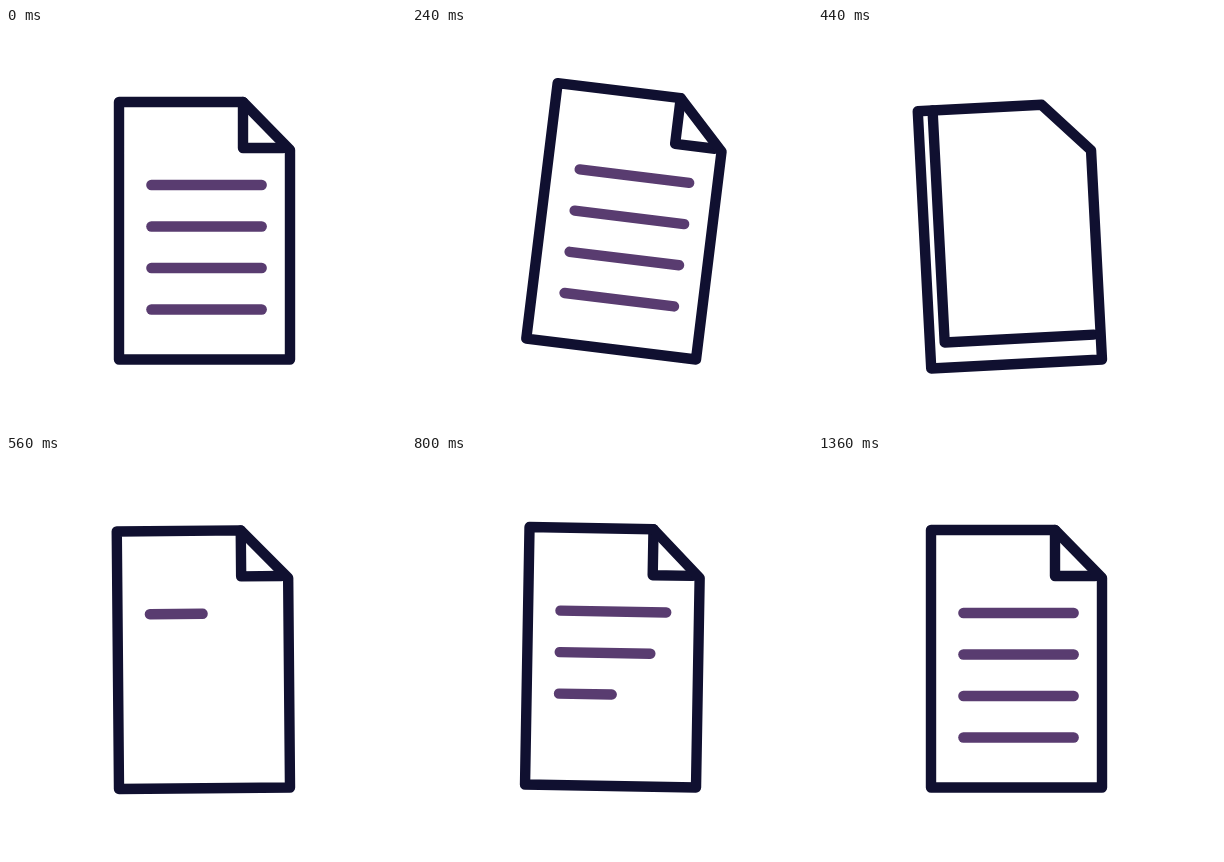
An HTML page that plays this animation: 400x400 px, repeating every 1960 ms.

```html
<!DOCTYPE html>
<html lang="en">
<head>
<meta charset="utf-8">
<title>Turning page</title>
<style>
  html, body { margin: 0; height: 100%; overflow: hidden; background: #fff; }
  svg { display: block; width: 100vw; height: 100vh; }
  path { fill: #fff; stroke: #101030; stroke-width: 10.4; stroke-linecap: round; stroke-linejoin: round; }
  #lines path { stroke: #593c70; }
  #cover { stroke: none; }
  #flap, #outline { fill: none; }
</style>
</head>
<body>
<svg viewBox="0 0 400 400">
  <g id="page">
    <g id="lines"><path/><path/><path/><path/></g>
    <path id="cover"/>
    <path id="flap"/>
    <path id="outline" d="M113 74H237L284 122V331.5H113Z"/>
  </g>
</svg>
<script>
const LOOP = 1960, STEP = 40, TURN_START = 240, TURN_END = 495;
const SWING = [[0, 0], [240, 7], [440, -3], [680, 2], [920, 0]]; // [ms, degrees]

const byId = id => document.getElementById(id);
const page = byId('page'), cover = byId('cover'), flap = byId('flap');
const lines = [...byId('lines').children];

const progress = (t, start, end) => Math.min(1, Math.max(0, (t - start) / (end - start)));
const smooth = p => p * p * (3 - 2 * p);
const easeOut = p => 1 - (1 - p) ** 4;

function swingAngle(t) {
  let angle = 0;
  for (let i = 1; i < SWING.length; i++) {
    const [start, from] = SWING[i - 1], [end, to] = SWING[i];
    angle += (to - from) * smooth(progress(t, start, end));
  }
  return angle;
}

function draw(t) {
  const turned = t >= TURN_END;
  page.setAttribute('transform', `rotate(${swingAngle(t)} 284 331.5)`);

  // The folded corner sweeps down to the far corner and wipes the old lines.
  const fold = turned ? 0 : smooth(progress(t, TURN_START, TURN_END));
  const x = 237 - 124 * fold, y = 120 + 211.5 * fold;
  flap.setAttribute('d', `M${x} 74V${y}H277`);
  cover.setAttribute('d', `M${x} 74V${y}H284V122L237 74Z`);

  lines.forEach((line, i) => {
    const start = 470 + 120 * i;
    const length = turned ? 110.3 * easeOut(progress(t, start, start + 600)) : 110.3;
    line.setAttribute('d', length ? `M145.4 ${157 + 41.5 * i}h${length}` : '');
  });
}

function tick() {
  const t = performance.now() % LOOP;
  draw(Math.floor(t / STEP) * STEP);
  requestAnimationFrame(tick);
}
tick();
</script>
</body>
</html>
```
